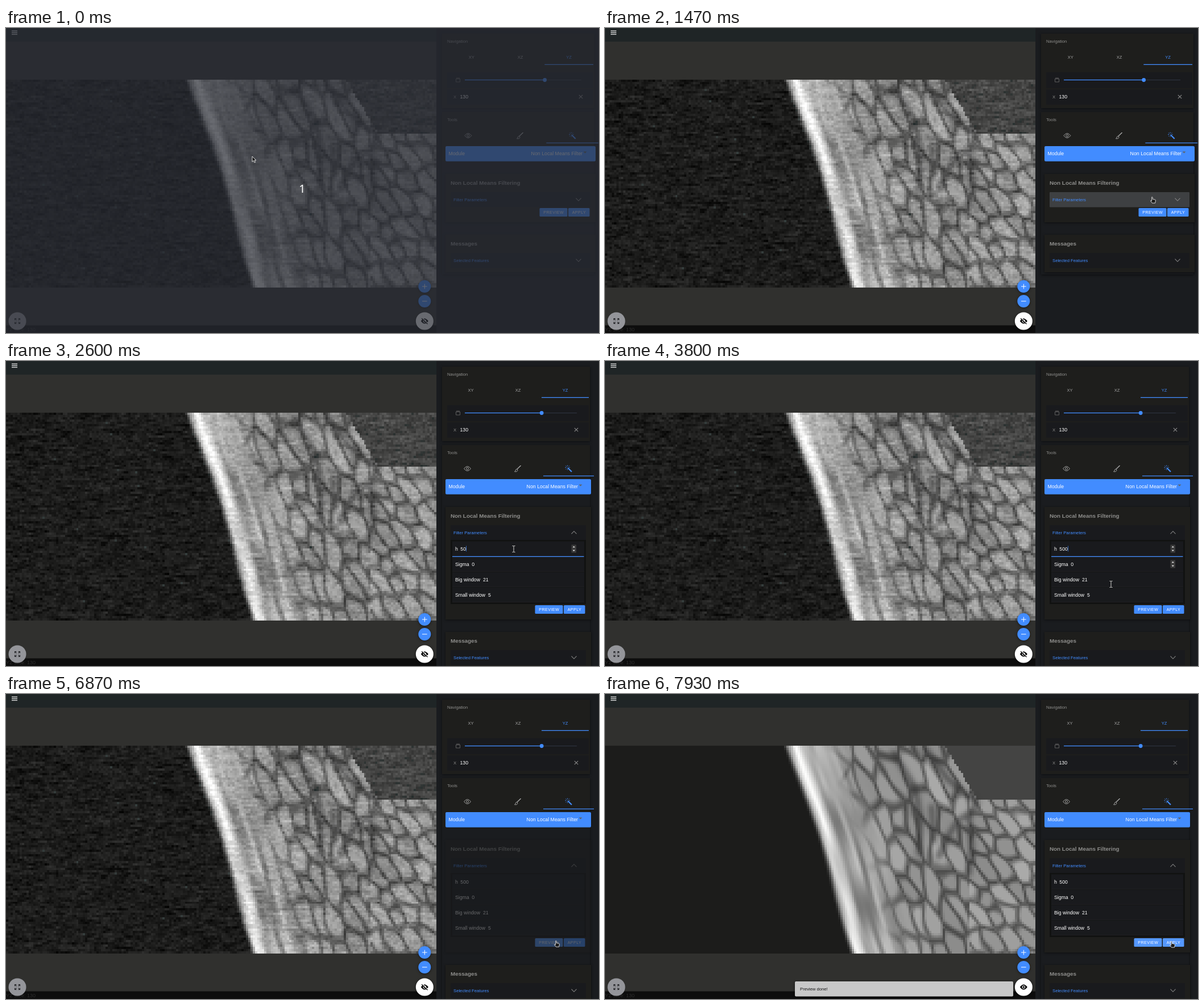
Write an HTML page with a canvas that moves like this. It is 1043 by 537 pixels and loops after 8000 ms.

```html
<!DOCTYPE html>
<html lang="en">
<head>
<meta charset="utf-8">
<title>Filter preview</title>
<style>
  html, body { margin: 0; width: 100%; height: 100%; overflow: hidden; background: #30302e; }
  canvas, svg.stage { position: absolute; left: 0; top: 0; }
  canvas { top: 91px; width: 757px; height: 366px; image-rendering: pixelated; }
  text { font-family: "Liberation Sans", Arial, sans-serif; white-space: pre; }
</style>
</head>
<body>
<canvas id="noisy"></canvas>
<canvas id="smooth"></canvas>
<svg class="stage" id="ui" width="1043" height="537"></svg>
<script>
const BLUE = '#428cff', PANEL = '#1a1c1f', CARD = '#1e1e1c', ITEM = '#191a1d', GREY = '#8e8e8c';
const STEP = 1000 / 15, STEPS = 120;

const clamp = v => Math.max(0, Math.min(1, v));
const ramp = (s, from, to) => clamp((s - from) / (to - from));
const smooth = v => v * v * (3 - 2 * v);
const within = (s, from, to) => s >= from && s < to;
const mix = (a, b, k) => a + (b - a) * k;

/* ---- scan picture ---- */
const DARK_GAPS = 'M560 91L603 150L655 192L640 212L622 222L606 245L585 290M640 212L645 270L640 320' +
  'M574 195L578 262M505 100L545 165L556 225L552 285';

function hash(i, j) {
  const v = Math.sin(i * 127.1 + j * 311.7) * 43758.5453;
  return v - Math.floor(v);
}

function softNoise(x, y) {
  const i = Math.floor(x), j = Math.floor(y), a = smooth(x - i), b = smooth(y - j);
  return mix(mix(hash(i, j), hash(i + 1, j), a), mix(hash(i, j + 1), hash(i + 1, j + 1), a), b);
}

// Gap to the next cell and tone of the nearest one, on a jittered lattice.
function cells(u, v) {
  let near = 9, next = 9, tone = 0;
  const ci = Math.floor(u), cj = Math.floor(v);
  for (let i = ci - 1; i <= ci + 1; i++) for (let j = cj - 1; j <= cj + 1; j++) {
    const d = Math.hypot(i + .15 + .7 * hash(i, j) - u, j + .1 + .8 * hash(j + 9, i) - v);
    if (d < near) { next = near; near = d; tone = hash(i + 5, j + 3); }
    else if (d < next) next = d;
  }
  return { gap: next - near, tone };
}

function tissue(x, y) {
  const depth = x - 321 - .32 * (y - 91) + 4 * Math.sin(y / 55);
  const inside = smooth(ramp(depth, -5, 9));
  if (!inside) return 28;
  if (y < 188 && x > 597 + .62 * (y - 91)) return 68;
  const wobble = 10 * softNoise(x / 30, y / 40);
  const cell = x < 642 ? cells((x - .34 * y + wobble) / 27, (y + wobble) / 62)
                       : cells((x - .55 * y + wobble) / 29, (y + wobble) / 42);
  const cellTone = 74 + 66 * smooth(ramp(cell.gap, 0, .42)) + 30 * cell.tone;
  const streaks = 112 + 85 * softNoise(depth / 9, y / 75) + 75 * Math.exp(-(((depth - 16) / 13) ** 2));
  return mix(28, mix(streaks, cellTone, smooth(ramp(depth, 55, 125))), inside);
}

function drawScan(id, grain) {
  const canvas = document.getElementById(id), w = canvas.width = 190, h = canvas.height = 92;
  const c = canvas.getContext('2d'), image = c.createImageData(w, h);
  for (let i = 0; i < w * h; i++) {
    const v = tissue((i % w + .5) * 757 / w, 91 + (Math.floor(i / w) + .5) * 366 / h);
    image.data.set([v, v, v - 1, 255], i * 4);
  }
  c.putImageData(image, 0, 0);
  c.setTransform(w / 757, 0, 0, h / 366, 0, -91 * h / 366);
  c.filter = 'blur(0.8px)';
  c.strokeStyle = 'rgba(48,48,48,.75)';
  c.lineWidth = 8;
  c.lineJoin = 'round';
  c.stroke(new Path2D(DARK_GAPS));
  if (!grain) return;

  const noisy = c.getImageData(0, 0, w, h), px = noisy.data;
  let last = 0;
  for (let i = 0; i < px.length; i += 4) {
    last = last * .5 + (hash(i, 1) + hash(i, 2) + hash(i, 3) - 1.5) * grain;
    for (let k = 0; k < 3; k++) px[i + k] += last * (px[i] > 50 ? 1 : .75);
  }
  c.putImageData(noisy, 0, 0);
}

/* ---- markup helpers ---- */
const rect = (x, y, x2, y2, fill, more = '') =>
  `<rect x="${x}" y="${y}" width="${x2 - x}" height="${y2 - y}" fill="${fill}" ${more}/>`;
const text = (x, cy, str, fill = '#fff', size = 8.7, more = '') =>
  `<text x="${x}" y="${cy + size * .36}" fill="${fill}" font-size="${size}" ${more}>${str}</text>`;
const stroke = (d, color, width = 1, more = '') =>
  `<path d="${d}" fill="none" stroke="${color}" stroke-width="${width}" ${more}/>`;
const dot = (x, y, r, fill) => `<circle cx="${x}" cy="${y}" r="${r}" fill="${fill}"/>`;
const group = (x, y, body, more = '') => `<g transform="translate(${x} ${y})" ${more}>${body}</g>`;
const MID = 'text-anchor="middle"', END = 'text-anchor="end"', BOLD = 'font-weight="bold"';
const SHADOW = 'style="filter:drop-shadow(0 1px 2px #0008)"';

/* ---- pointer: step, x, y ---- */
const MOVES = [[3, 437, 231], [16, 964, 307], [17, 964, 303], [22, 964, 303], [29, 898, 328], [33, 893, 331],
  [54, 893, 331], [57, 890, 393], [59, 920, 408], [62, 987, 412], [73, 987, 412], [75, 989, 412], [77, 989, 412],
  [83, 973, 439], [84, 973, 439], [87, 969, 440], [116, 969, 440], [119, 998, 441]];

function pointerAt(s) {
  const next = MOVES.findIndex(m => m[0] > s);
  if (next === 0) return MOVES[0].slice(1);
  if (next < 0) return MOVES[MOVES.length - 1].slice(1);
  const [a, x, y] = MOVES[next - 1], [b, x2, y2] = MOVES[next];
  const raw = (s - a) / (b - a), k = b - a > 9 ? smooth(raw) : raw;
  return [mix(x, x2, k), mix(y, y2, k)];
}

function pointer(s) {
  const [x, y] = pointerAt(s);
  const edge = 'stroke="#fff" stroke-width=".8" stroke-linejoin="round"';
  if (s < 15) return group(x - 4, y - 5, `<path d="M0 0V9.5L2.3 7.4L4 11L5.6 10.3L4 6.9H7Z" fill="#1b1b1b" ${edge}/>`);
  if (within(s, 26, 81)) {
    const beam = 'M-2.5 -5.5H-.8L0 -4.8L.8 -5.5H2.5M0 -4.8V4.8M-2.5 5.5H-.8L0 4.8L.8 5.5H2.5';
    return group(x, y, stroke(beam, '#111', 2) + stroke(beam, '#ddd', 1));
  }
  return group(x, y, `<path d="M-2.4 -5.2Q-1.4 -6 -.8 -5V-1.6L3.6 -.8Q4.6 -.4 4.4 1L3.6 5.2H-1.6L-4.6 1.2Q-4.4 0 -2.4 1.4Z" fill="#1b1b1b" ${edge}/>`);
}

/* ---- panel parts ---- */
const eyeOutline = 'M-6 0Q0 -8 6 0Q0 8 -6 0Z';

function navigation(right) {
  const tab = (right - 786) / 3, centre = i => 776 + tab * (i + .5), knob = 807 + (right - 838) * .686;
  return rect(767, 10, right - 8, 141, CARD, SHADOW) +
    text(776, 23.5, 'Navigation', GREY, 7.7) +
    ['XY', 'XZ', 'YZ'].map((name, i) => text(centre(i), 51.5, name, i < 2 ? '#a2a2a2' : BLUE, 7.6, MID)).join('') +
    rect(776 + 2 * tab, 63.7, right - 10, 65, BLUE) +
    rect(776, 78, right - 10, 106, ITEM) + rect(776, 108, right - 10, 135, ITEM) +
    group(795, 91, stroke('M-3.5 -1.5H3.5V4H-3.5ZM-3 -3H3', '#666', .9)) +
    rect(807, 91, right - 31, 92, '#303542') + rect(807, 90.8, knob, 92.1, BLUE) + dot(knob, 91.5, 3.4, BLUE) +
    text(787, 121, 'X', GREY, 7.6) + text(798.5, 121, '130') +
    group(right - 32, 121, stroke('M-3.2 -3.2L3.2 3.2M3.2 -3.2L-3.2 3.2', '#8a8a8a', 1.1));
}

function tools(right, bottom) {
  const tab = (right - 768) / 3, centre = i => 767 + tab * (i + .5);
  return rect(767, 148, right - 8, bottom, CARD, SHADOW) + rect(767, 235, right - 8, bottom, PANEL) +
    text(776, 161.5, 'Tools', GREY, 7.7) +
    group(centre(0), 189.5, stroke(eyeOutline, '#a2a2a2') + `<circle r="2" fill="none" stroke="#a2a2a2"/>`) +
    group(centre(1), 189.5, stroke('M5.5 -5.5L-1.5 1.5M4.5 -5.5L-2.5 1M-2 1Q-4.5 1 -4.5 4L-6 5.2Q-1 6.2 -.5 2.6Z', '#a2a2a2')) +
    group(centre(2), 189.5, stroke('M-1.5 -1.5L5.5 5.5', BLUE, 2.2) +
      stroke('M-2 -6V-4M-6 -2H-4M-5 -5L-3.6 -3.6M1.2 -5L0 -3.8M-5 1.2L-3.8 0M1 -2H2.5M-2 1V2.5', BLUE, .9)) +
    rect(767 + 2 * tab, 201.8, right - 1, 203, BLUE) +
    rect(773, 208, right - 6, 234.7, BLUE, 'rx="2"') +
    text(778.5, 221, 'Module') + text(right - 29, 221, 'Non Local Means Filter', '#fff', 8.8, END) +
    group(right - 24.5, 219, '<path d="M-2.9 -1.4H2.9L0 1.6Z" fill="#5f6266"/>');
}

function spinner(cy) {
  return rect(994.5, cy - 7, 1003, cy + 7, '#3b3b3b') +
    group(998.8, cy, '<path d="M-2 -2.2L0 -4.4L2 -2.2ZM-2 2.2L0 4.4L2 2.2Z" fill="#fff"/>');
}

function parameters(s) {
  const rows = [
    ['h', s < 51 ? '50' : '500', 799.3, within(s, 36, 66)],
    ['Sigma', '0', 819.3, within(s, 56, 59)],
    ['Big window', '21', 839, within(s, 58, 61)],
    ['Small window', '5', 848, within(s, 60, 98)]
  ];
  const caret = (x, cy, on) => on ? rect(x, cy - 5, x + .7, cy + 5, BLUE) : '';
  const focus = (y, from, to) => within(s, from, to)
    ? rect(785, y - 1.3, 1016.5, y, BLUE, `opacity="${ramp(s, from - 1, from + 3)}"`) : '';
  return rect(782, 315, 1020, 428, '#111211') +
    rows.map(([label, value, x, hot], i) => {
      const cy = 330.5 + 27 * i;
      return rect(785, cy - 13, 1017, cy + 13.5, ITEM) + rect(785, cy + 13, 1017, cy + 13.5, '#242527') +
        text(790, cy, label) + text(x, cy, value) + (hot ? spinner(cy) : '');
    }).join('') +
    focus(345, 36, 66) + focus(425, 66, 98) +
    caret(809.2, 330.5, within(s, 37, 45)) + caret(814.2, 330.5, within(s, 51, 59)) +
    caret(852.6, 411.5, within(s, 67, 75) || within(s, 85, 93));
}

function accordion(right, y, label, up, fill = ITEM) {
  const tip = 2.3 - 4.6 * up;
  return rect(782, y - 13, right - 15, y + 13.5, fill, 'rx="1"') + text(787, y, label, BLUE, 7.7) +
    group(right - 36, y, stroke(`M-4.5 ${-tip}L0 ${tip}L4.5 ${-tip}`, '#858585', 1.1));
}

function button(x, x2, cy, label, hot) {
  return rect(x, cy - 7.5, x2, cy + 7.5, hot ? '#5598ff' : BLUE, 'rx="1.5"') +
    text((x + x2) / 2 + .2, cy, label, '#fff', 7.1, MID + ' letter-spacing=".43"');
}

function filterCard(s, right, open, drop) {
  const dim = within(s, 98, 104) ? 1 - .67 * ramp(s, 98, 100) : 1;
  return `<g opacity="${dim}">` + rect(773, 257, right - 6, 342 + drop, CARD, SHADOW) +
    text(782, 272, 'Non Local Means Filtering', GREY, 9.85, BOLD) +
    accordion(right, 302, 'Filter Parameters', open, within(s, 22, 33) ? '#3e4042' : ITEM) +
    (drop ? `<svg y="315" width="1043" height="${drop}">${group(0, -315, parameters(s))}</svg>` : '') +
    button(right - 104.5, right - 55.5, 324.5 + drop, 'PREVIEW', s >= 81) +
    button(right - 54, right - 16.5, 324.5 + drop, 'APPLY', s >= 118) + '</g>';
}

function viewer(s) {
  const done = s >= 104;
  const eye = `<path d="M-6.5 0Q0 -9 6.5 0Q0 9 -6.5 0Z"/>` + dot(0, 0, 2.8, '#fff') + dot(0, 0, 1.8, '#000') +
    (done ? '' : stroke('M-5 -5.6L6 5', '#fff', 2) + stroke('M-5.2 -4.8L5.2 5.2', '#000', 1.2));
  return rect(0, 0, 757, 24, '#1f2526') + rect(0, 523.5, 757, 537, '#0d0d0d') +
    stroke('M10 5.2H20M10 8.2H20M10 11.2H20', '#f2f2f2', 1.2) +
    text(0, 531, 'YZ slice: 130', '#2d2d2d', 9) +
    dot(20, 516, 15.5, '#94959a') +
    group(20, 516, stroke('M-4.5 -1.5V-4.5H-1.5M1.5 -4.5H4.5V-1.5M4.5 1.5V4.5H1.5M-1.5 4.5H-4.5V1.5' +
      'M-4.5 -4.5L-1.5 -1.5M4.5 -4.5L1.5 -1.5M4.5 4.5L1.5 1.5M-4.5 4.5L-1.5 1.5', '#26272a', 1.1)) +
    [455, 481].map(y => `<g ${SHADOW}>${dot(736.3, y, 11, BLUE)}</g>`).join('') +
    stroke('M732 455H740.6M736.3 450.7V459.3M732 481H740.6', '#fff', 1) +
    `<g ${SHADOW}>${dot(736.3, 516, 15.5, '#fff')}</g>` + group(736.3, 516, eye) +
    (done ? `<g opacity="${ramp(s, 103, 107)}">` + rect(334, 506, 718, 532.5, '#c8c8c8', 'rx="2" ' + SHADOW) +
      text(343, 519.5, 'Preview done!', '#161616', 7.7) + '</g>' : '');
}

function render(s) {
  const open = smooth(ramp(s, 22, 27)), drop = 113 * open, right = s < 25 ? 1043 : 1035;
  ui.innerHTML = viewer(s) + rect(757, 0, 1043, 537, PANEL) +
    navigation(right) + tools(right, 434 + drop) + filterCard(s, right, open, drop) +
    group(0, drop, rect(773, 364, right - 6, 430, CARD, SHADOW) +
      text(782, 379, 'Messages', GREY, 9.85, BOLD) + accordion(right, 409, 'Selected Features', 0)) +
    (s < 1 ? rect(0, 0, 1043, 537, '#282c34', 'opacity=".7"') +
      text(521, 282.5, '1', '#fff', 20, MID + ' style="font-family:\'Noto Sans\',sans-serif"') : '') +
    pointer(s);
  smoothScan.style.visibility = s >= 104 ? 'visible' : 'hidden';
}

const ui = document.getElementById('ui'), smoothScan = document.getElementById('smooth');
drawScan('noisy', 19);
drawScan('smooth', 0);

let shown = -1;
function tick() {
  const s = Math.floor((performance.now() % (STEP * STEPS) + 3.4) / STEP) % STEPS;
  if (s !== shown) render(shown = s);
  requestAnimationFrame(tick);
}
tick();
</script>
</body>
</html>
```
